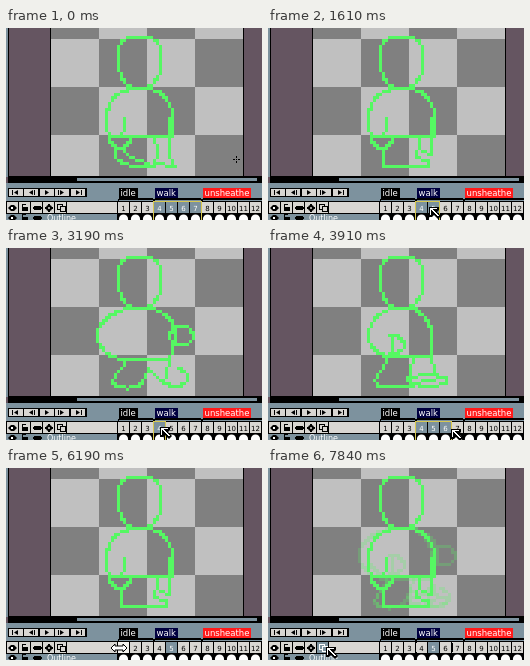
Animation of 256x192 px, one loop 8000 ms. Source, as an HTML page with a canvas:

```html
<!DOCTYPE html>
<html lang="en">
<head>
<meta charset="utf-8">
<title>Timeline range selection</title>
<style>
html, body { margin: 0; width: 100%; height: 100%; overflow: hidden; background: #655561; }
canvas { display: block; width: 256px; height: 192px; image-rendering: pixelated; }
</style>
</head>
<body>
<canvas id="stage" width="256" height="192"></canvas>
<script>
const g = document.getElementById('stage').getContext('2d');
const LOOP = 8000, TICK = 48, CELL = 12;
const PRESS = 1220, RELEASE = 4620, PICK = 5320, ONION = 7840;
const FACE = '#d8d6d2', LIT = '#f4f2ee', BLUE = '#7d929e', PAD = '#655561', GREEN = '#55f862';

// Pointer glides: start, end, x, y
const glides = [
  [250, 980, 152, 179],
  [1560, 2180, 190, 179],
  [2640, 3330, 152, 179],
  [3510, 4110, 188, 181],
  [4290, 4380, 188, 180],
  [4620, 5340, 166, 179],
  [5990, 6790, 43, 181],
  [7180, 7360, 63, 179],
  [7510, 7660, 58, 179]
];

// Elliptic arc on the sprite grid, angles in turns; a power below 1 makes it boxier.
function arc(cx, cy, rx, ry, from, to, power = 1) {
  const bend = v => Math.sign(v) * Math.abs(v) ** power;
  return Array.from({ length: 25 }, (_, k) => {
    const a = 2 * Math.PI * (from + (to - from) * k / 24);
    return [Math.round(cx + rx * bend(Math.cos(a))), Math.round(cy + ry * bend(Math.sin(a)))];
  });
}

const head = [arc(29, 6, 7, 7, 0.5, 1, 0.55), arc(29, 6, 7, 10, 0, 0.5, 0.85)];

const shoulders = (left, right, y) =>
  [arc(28, y, left, y - 16, 0.5, 0.75), arc(31, y, right, y - 16, 0.75, 1)];

const front = [
  ...head, ...shoulders(10, 9, 26),
  [[18, 26], [18, 30], [19, 32], [40, 32], [40, 26]],
  [[24, 26], [24, 30], [22, 32]],
  [[39, 26], [39, 32]],
  arc(22.5, 32, 3.5, 4, 0, 0.5)
];

const poses = {
  4: [...head, ...shoulders(13, 10, 25),
    arc(25, 25, 10, 8, 0.25, 0.5),
    arc(43, 25, 4, 3, 0, 1),
    [[41, 25], [39, 33], [25, 33], [20, 40]],
    arc(25, 40, 5, 2.5, 0, 0.5),
    [[30, 40], [32, 36], [37, 41], [39, 33]],
    arc(41, 39, 4, 3, -0.2, 0.4)],
  5: [...front,
    [[23, 36], [23, 42], [38, 42], [38, 40], [34, 39], [35, 33]],
    [[39, 32], [39, 38], [36, 37]]],
  6: [...head, ...shoulders(10, 8, 25),
    arc(26, 25, 8, 7, 0.25, 0.5),
    [[39, 25], [39, 32], [25, 32], [20, 40], [21, 42], [32, 42]],
    arc(25, 28, 5, 3, -0.25, 0.25),
    [[26, 25], [26, 31]],
    [[33, 32], [31, 40], [33, 42]],
    arc(38, 40, 6, 2, 0, 1),
    [[33, 41], [43, 39]],
    [[39, 32], [40, 37]]],
  7: [...front,
    arc(30, 38, 9, 4, 0.25, 0.55),
    [[30, 42], [34, 42]],
    [[24, 37], [26, 39], [32, 41]],
    [[34, 33], [35, 37], [34, 41], [41, 42], [39, 39], [39, 33]]]
};

function box(x, y, w, h, color) {
  g.fillStyle = color;
  g.fillRect(x, y, w, h);
}

function label(s, x, y, color, size, align = 'left') {
  g.font = size + 'px "DejaVu Sans", sans-serif';
  g.textAlign = align;
  g.fillStyle = color;
  g.fillText(s, x, y);
}

function poly(points, color) {
  g.fillStyle = color;
  g.beginPath();
  points.forEach(p => g.lineTo(...p));
  g.fill();
}

function dot(x, y, r, color) {
  g.fillStyle = color;
  g.beginPath();
  g.arc(x, y, r, 0, 7);
  g.fill();
}

// Each sprite pixel covers 3 x 3; the set keeps overlaps from doubling.
function sprite(frame, alpha) {
  const seen = new Set();
  for (const line of poses[frame]) {
    for (let k = 1; k < line.length; k++) {
      const [ax, ay] = line[k - 1], [bx, by] = line[k];
      const n = Math.max(Math.abs(bx - ax), Math.abs(by - ay)) || 1;
      for (let s = 0; s <= n; s++) {
        seen.add(Math.round(ax + (bx - ax) * s / n) + ',' + Math.round(ay + (by - ay) * s / n));
      }
    }
  }
  g.globalAlpha = alpha;
  for (const key of seen) {
    const [i, j] = key.split(',');
    box(45 + 3 * i, 11 + 3 * j, 3, 3, GREEN);
  }
  g.globalAlpha = 1;
}

function editor(frame, onion) {
  box(0, 0, 256, 149, PAD);
  box(44, 0, 194, 149, '#000');
  for (let j = -1; j < 3; j++) {
    for (let i = 0; i < 4; i++) {
      box(45 + 48 * i, 11 + 48 * j, 48, 48, (i + j) & 1 ? '#808080' : '#c0c0c0');
    }
  }
  if (onion) [4, 6].forEach(n => sprite(n, 0.25));
  sprite(frame, 1);
  box(0, 0, 2, 149, BLUE);
  box(2, 0, 1, 149, '#000');
  box(2, 148, 254, 7, '#000');
  box(71, 150, 180, 3, BLUE);
}

function playButtons() {
  box(2, 160, 79, 9, '#000');
  for (let k = 0; k < 5; k++) {
    const x = 3 + Math.floor(k * 15.6), c = x + 7, d = k < 2 ? -1 : 1;
    box(x, 161, 14, 7, FACE);
    poly([[c - 2 * d, 162], [c + 2 * d, 164.5], [c - 2 * d, 167]], '#000');
    if (k !== 2) box(c + (k === 0 || k === 3 ? -4 : 3), 162, 1, 5, '#000');
  }
}

function tag(text, x, w, cells, color) {
  const end = x + cells * CELL - 2;
  box(x, 160, w, 10, color);
  label(text, x + 1.5, 168, '#fff', 8.5);
  box(x, 170, end - x, 2, '#000');
  box(x - 1, 171, 1, 3, '#000');
  box(end, 171, 1, 3, '#000');
}

function layerIcons(y) {
  poly([[2, y], [5, y - 3], [8, y - 3], [11, y], [8, y + 3], [5, y + 3]], '#000');
  box(5, y - 1, 2, 2, '#fff');
  box(16, y - 1, 6, 4, '#000');
  box(16, y - 4, 1, 3, '#000');
  box(17, y - 4, 3, 1, '#000');
  box(28, y - 2, 7, 4, '#000');
  box(27, y - 1, 9, 2, '#000');
}

function toolbar(hover, onion) {
  const on = k => onion && k === 4;
  for (let k = 0; k < 5; k++) {
    box(k * CELL + 1, 174, 11, 11, on(k) ? BLUE : hover === k ? LIT : FACE);
  }
  box(61, 174, 50, 11, FACE);
  layerIcons(180);
  dot(43, 180, 3, '#000');
  box(42, 176, 2, 8, '#000');
  box(39, 179, 8, 2, '#000');
  dot(43, 180, 1, FACE);
  for (const d of [0, 3]) {
    box(51 + d, 176 + d * 2 / 3, 6, 6, on(4) ? '#fff' : '#000');
    box(52 + d, 177 + d * 2 / 3, 4, 4, on(4) ? BLUE : FACE);
  }
}

function timeline(t, frame, hover, onion) {
  box(0, 155, 256, 37, BLUE);
  box(0, 173, 256, 19, '#000');
  playButtons();
  tag('idle', 113, 19, 3, '#000');
  tag('walk', 149, 23, 4, '#000040');
  tag('unsheathe', 197, 48, 6, '#ff1a1a');
  toolbar(hover, onion);

  box(0, 186, 111, 6, BLUE);
  layerIcons(190);
  label('Outline', 41, 193, '#fff', 8);

  const ranged = t < PICK;
  const from = ranged ? 4 : 5;
  const to = t < PRESS || (ranged && t >= RELEASE) ? 7 : frame;
  for (let n = 1; n <= 12; n++) {
    const x = 100 + CELL * n, on = n >= from && n <= to;
    box(x, 174, 11, 11, on ? BLUE : hover === n + 100 ? LIT : FACE);
    label(n, x + 5.5, 183, on ? '#fff' : '#000', 7, 'center');
    dot(x + 5.5, 191, 4.6, '#fff');
  }
  if (ranged) {
    g.strokeStyle = '#d8c850';
    g.strokeRect(147.5, 173.5, (to - from + 1) * CELL, 24);
  }
  if (onion) {
    for (const [x, d] of [[147, 1], [184, -1]]) {
      box(x, 175, 1, 9, '#000');
      box(x + d, 174, 1, 1, '#000');
      box(x + d, 184, 1, 1, '#000');
    }
  }
}

function pointer(x, y, resize) {
  if (y < 148) {
    for (const d of [-3, 2]) {
      box(x + d, y, 2, 1, '#000');
      box(x, y + d, 1, 2, '#000');
    }
    box(x, y, 1, 1, '#000');
  } else if (resize) {
    const side = d => [[8 * d, 0], [4 * d, 4 * d], [4 * d, 2 * d], [-4 * d, 2 * d], [-4 * d, 4 * d]];
    const shape = [...side(1), ...side(-1)].map(([px, py]) => [x + px, y + py]);
    poly(shape, '#fff');
    g.strokeStyle = '#000';
    g.closePath();
    g.stroke();
  } else {
    poly([[0, 0], [10, 0], [10, 3], [8, 5], [12, 9], [9, 12], [5, 8], [3, 10], [0, 10]]
      .map(([px, py]) => [x + px, y + py]), '#000');
    box(x + 1, y + 1, 7, 1, '#fff');
    box(x + 1, y + 1, 1, 7, '#fff');
    for (let k = 2; k < 9; k++) box(x + k, y + k, 2, 1, '#fff');
  }
}

function pointerAt(t) {
  let x = 230, y = 131;
  for (const [start, end, toX, toY] of glides) {
    if (t < start) break;
    const step = (Math.floor((t - start) / TICK) + 1) * TICK;
    const p = Math.sin(Math.PI / 2 * Math.min(1, step / (end - start + TICK)));
    x += (toX - x) * p;
    y += (toY - y) * p;
  }
  return [Math.round(x), Math.round(y)];
}

const cellAt = x => Math.floor((x - 100) / CELL);

function hoverAt(x, y) {
  if (y < 174 || y > 185) return -1;
  return x < 61 ? Math.floor(x / CELL) : x >= 112 ? 100 + cellAt(x) : -1;
}

function frameAt(t, x) {
  if (t >= PICK) return 5;
  const dragging = t >= PRESS && t < RELEASE;
  return dragging ? Math.min(7, Math.max(4, cellAt(x))) : 7;
}

function draw(t) {
  const [x, y] = pointerAt(t);
  const frame = frameAt(t, x), onion = t >= ONION;
  editor(frame, onion);
  timeline(t, frame, hoverAt(x, y), onion);
  pointer(x, y, Math.abs(x - 111) < 5);
}

const start = performance.now();
function tick() {
  draw((performance.now() - start) % LOOP);
  requestAnimationFrame(tick);
}
tick();
</script>
</body>
</html>
```
